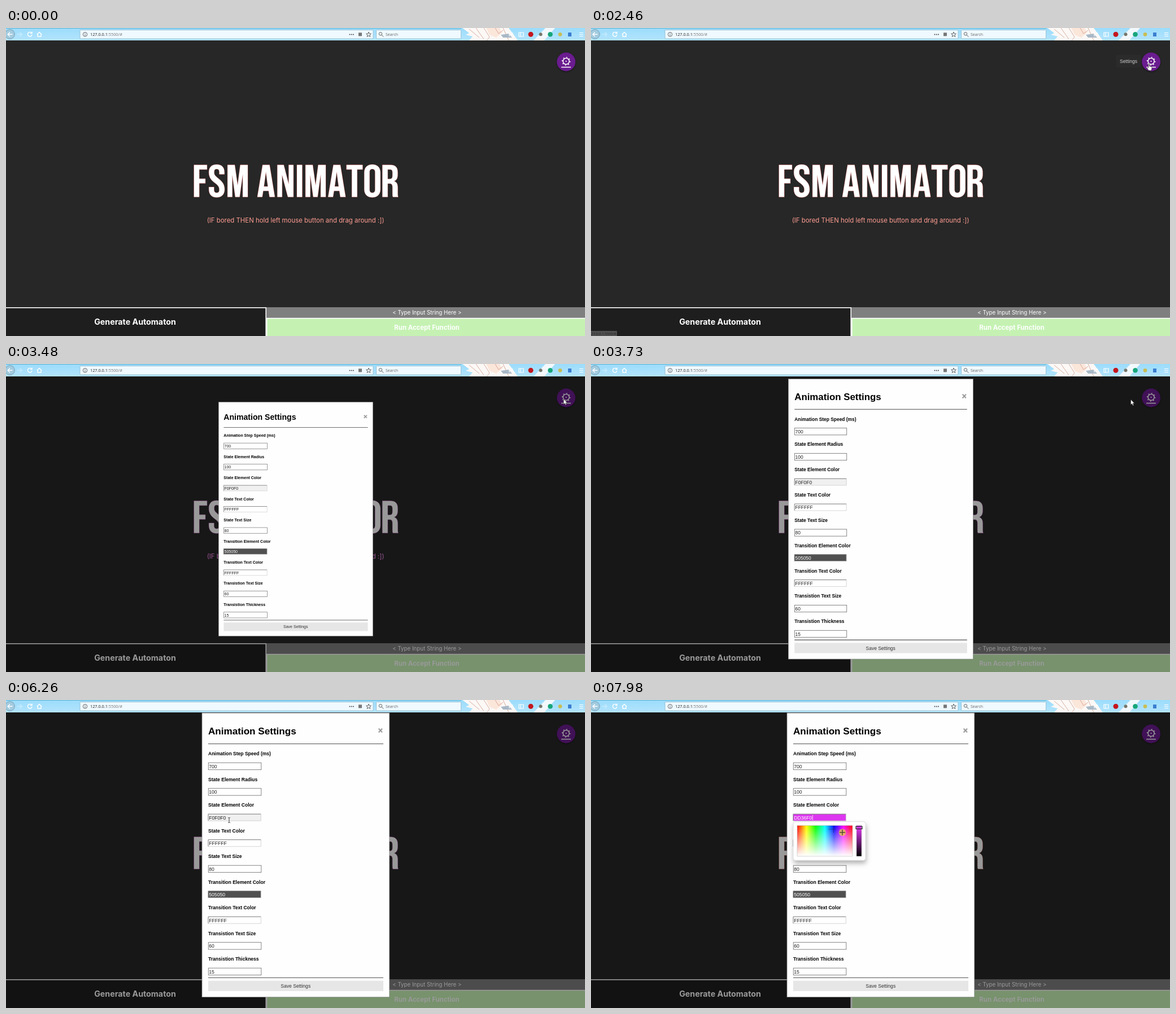
Animation of 1025x546 px, one loop 8 s. Source, as an HTML page:

```html
<!DOCTYPE html>
<html lang="en">
<head>
<meta charset="utf-8">
<title>FSM Animator</title>
<style>
  html, body { margin: 0; width: 100%; height: 100%; overflow: hidden; background: #272727; }
  svg { display: block; width: 100vw; height: 100vh; }
  .brand { font-family: Inter, sans-serif; text-anchor: middle; }
  .chrome { font-family: "Open Sans", sans-serif; }
  .form { font-family: "Liberation Sans", Arial, sans-serif; }
</style>
</head>
<body>
<svg id="stage" viewBox="0 0 1025 546" preserveAspectRatio="none">
  <defs>
    <linearGradient id="bar" x2="0" y2="1">
      <stop offset="0" stop-color="#9bdcfb"/><stop offset="1" stop-color="#b4e4fd"/>
    </linearGradient>
    <linearGradient id="hue">
      <stop offset="0" stop-color="#f00"/><stop offset=".1667" stop-color="#ff0"/>
      <stop offset=".3333" stop-color="#0f0"/><stop offset=".5" stop-color="#0ff"/>
      <stop offset=".6667" stop-color="#00f"/><stop offset=".8333" stop-color="#f0f"/>
      <stop offset="1" stop-color="#f00"/>
    </linearGradient>
    <linearGradient id="fade" x2="0" y2="1">
      <stop offset="0" stop-color="#fff" stop-opacity="0"/><stop offset="1" stop-color="#fff"/>
    </linearGradient>
    <linearGradient id="level" x2="0" y2="1">
      <stop id="levelTop" offset="0" stop-color="#fff"/><stop offset="1" stop-color="#000"/>
    </linearGradient>
    <filter id="drop" x="-30%" y="-30%" width="160%" height="180%">
      <feDropShadow dx="1" dy="5" stdDeviation="4" flood-opacity=".3"/>
    </filter>
    <filter id="lift" x="-30%" y="-30%" width="160%" height="160%">
      <feDropShadow dx="0" dy="1.2" stdDeviation="1.5" flood-opacity=".55"/>
    </filter>
    <clipPath id="barClip"><rect width="1025" height="22"/></clipPath>
  </defs>

  <g id="page">
    <rect y="22" width="1025" height="524" fill="#272727"/>
    <g id="title" fill="#fff" fill-rule="evenodd" stroke-width=".7" paint-order="stroke"></g>
    <text id="hint" class="brand" x="512.6" y="345" font-size="11.4">(IF bored THEN hold left mouse button and drag around :])</text>
    <rect y="495" width="461" height="51" fill="#fff"/>
    <rect y="496.6" width="459.4" height="49.4" fill="#1e1e1e"/>
    <text class="brand" x="228.5" y="526" font-size="14.25" font-weight="700" fill="#fff">Generate Automaton</text>
    <rect x="461" y="495" width="564" height="19" fill="#7f7f7f"/>
    <text class="brand" x="745.3" y="508" font-size="9.75" fill="#fff">&lt; Type Input String Here &gt;</text>
    <rect x="461" y="513.8" width="564" height="32.2" fill="#fff"/>
    <rect x="462.6" y="515.4" width="562.4" height="30.6" fill="#c5f2b3"/>
    <text class="brand" x="745" y="535" font-size="11.4" font-weight="700" fill="#fff">Run Accept Function</text>

    <circle cx="991.6" cy="60" r="16.4" fill="#6a1a8f" filter="url(#lift)"/>
    <g fill="none" stroke="#fff">
      <circle cx="991.6" cy="59" r="5.5" stroke-width="1.5"/>
      <circle cx="991.6" cy="59" r="7" stroke-width="1.7" stroke-dasharray="1.7 3.798"/>
      <path d="M983 69.5h17" stroke-width="1.5"/>
    </g>
    <circle cx="991.6" cy="59" r="1.1" fill="#fff"/>
    <g id="tooltip">
      <rect x="930" y="48" width="43.5" height="22" rx="2" fill="#2b2b2b"/>
      <text class="form" x="936" y="62" font-size="8.6" fill="#d0d0d0">Settings</text>
    </g>
    <g id="status">
      <rect y="537" width="46" height="9" fill="#505050"/>
      <text class="chrome" x="-3" y="544.3" font-size="6.1" fill="#222">127.0.0.1:5500/#</text>
    </g>
  </g>
  <rect id="dim" y="22" width="1025" height="524" opacity=".4"/>

  <g clip-path="url(#barClip)">
    <rect width="1025" height="22.5" fill="url(#bar)"/>
    <path d="M0 .5H806" stroke="#58b4d8"/>
    <path d="M808 0L820 9L814 12L826 15L820 22H906L890 0Z" fill="#fbf8f6"/>
    <path d="M850 0L856 12L868 17L878 8L874 0Z" fill="#fbe6da"/>
    <path d="M820 2L838 17M832 0L846 20M846 0L856 16L851 22M866 0L872 10L880 4M880 0L890 22" stroke="#c88f7c" stroke-width=".7" fill="none"/>
    <path d="M876 12L890 10L896 17H880Z" fill="#a9b8c6"/>
    <path d="M955 0H972L953 22H934Z" fill="#f2f8fc"/>

    <circle cx="7" cy="11" r="8.4" fill="#a3cbe0" stroke="#6d94a8" stroke-width=".8"/>
    <g fill="none" stroke="#fff" stroke-width="1.4">
      <path d="M11.5 11.3H3.5M7 7.5L3.2 11.3L7 15"/>
      <path d="M20 11.3H28M24.5 7.5L28.3 11.3L24.5 15" opacity=".35"/>
      <path d="M45 8.5A3.8 3.8 0 1 0 46 12M46 6.5V9.6H43"/>
      <path d="M54.8 11.5L59 7.5L63.2 11.5M56.2 11V15H62V11"/>
    </g>
    <g fill="#eff9ff" stroke="#8fb7ca" stroke-width=".8">
      <rect x="131" y="3.5" width="519" height="15.5" rx="1"/>
      <rect x="655.5" y="3.5" width="150" height="15.5" rx="1"/>
    </g>
    <g fill="none" stroke="#555" stroke-width=".9">
      <circle cx="140" cy="11.3" r="3.7"/><path d="M140 10.7V13.5M140 8.9V9.8"/>
      <path d="M642 7L643.2 10.1L646.4 10.2L643.9 12.3L644.8 15.4L642 13.6L639.2 15.4L640.1 12.3L637.6 10.2L640.8 10.1Z"/>
      <circle cx="663" cy="10.3" r="2.7"/><path d="M665 12.4L668.5 15.6"/>
    </g>
    <path d="M608.5 11.5h7" stroke="#444" stroke-width="2" stroke-linecap="round" stroke-dasharray="0 3.2"/>
    <rect x="624" y="8.3" width="6" height="6" fill="#777"/>
    <text class="chrome" x="149" y="14.2" font-size="7.3" fill="#777"><tspan fill="#222">127.0.0.1</tspan>:5500/#</text>
    <text class="chrome" x="672" y="14.2" font-size="7" fill="#666">Search</text>
    <g fill="none" stroke="#fff" stroke-width="1.2">
      <path d="M891 8V15M894 8V15M896 8L899 15"/>
      <path d="M908 8H916V15H908ZM911 8V15"/>
      <path d="M1015 8.5H1022M1015 11.5H1022M1015 14.5H1022"/>
    </g>
    <circle cx="929" cy="11.3" r="4.5" fill="#c4161d"/>
    <circle cx="946.5" cy="11.3" r="3" fill="#77776b"/>
    <circle cx="963.5" cy="11.3" r="4.3" fill="#17a67a"/>
    <circle cx="981" cy="11.3" r="3.4" fill="#c9bd55"/>
    <rect x="995" y="8" width="6" height="7" fill="#3b7fd0"/>
  </g>

  <g id="modal" class="form">
    <rect x="347" y="23" width="331.8" height="503.7" fill="#fefefe" stroke="#888" stroke-width=".7"/>
    <text x="358" y="61.4" font-size="17.1" font-weight="700">Animation Settings</text>
    <text x="658.8" y="59" font-size="14" font-weight="700" fill="#999" stroke="#999" stroke-width=".5">×</text>
    <path d="M358 77.6H668M358 492.4H668" stroke="#6e6e6e" stroke-width="1.3"/>
    <g id="fields" font-size="8.6"></g>
    <rect x="358" y="497.7" width="310" height="18.3" fill="#e6e6e6"/>
    <text x="512.7" y="510" font-size="8.6" fill="#333" text-anchor="middle">Save Settings</text>
    <path id="caret" stroke-width=".8"/>
    <g id="picker">
      <rect x="358" y="215.7" width="128" height="68.5" rx="4" fill="#fff" stroke="#ccc" stroke-width=".6" filter="url(#drop)"/>
      <rect x="365" y="222.5" width="98" height="54.5" fill="url(#hue)"/>
      <rect x="365" y="222.5" width="98" height="54.5" fill="url(#fade)" stroke="#bbb" stroke-width=".6"/>
      <rect x="470" y="222.5" width="9" height="54.5" fill="url(#level)" stroke="#bbb" stroke-width=".5"/>
      <rect x="469" y="224" width="11" height="4.5" fill="none" stroke="#222" stroke-width="1.2"/>
      <path id="trace" d="M420 229H434M429.5 223V235" stroke="#223" stroke-width=".8" opacity=".55"/>
      <path id="marker" d="M-5 0H5M0 -5V5" stroke="#222" stroke-width="1.4"/>
    </g>
  </g>

  <g id="cursor">
    <circle id="press" r="6.3" fill="#e6e02c" opacity=".65"/>
    <path id="arrow" d="M0 0V9.2L2.1 7.3L3.6 10.6L5.1 9.9L3.7 6.7H6.5Z" fill="#fff" stroke="#222" stroke-width=".6"/>
    <path id="hand" d="M-1 0C-1 -1 .8 -1 .8 0V4L5 5V8L4 11.5H-.5L-3.5 7.5C-4 6 -2.5 5.5 -1 7Z" fill="#fff" stroke="#222" stroke-width=".6"/>
    <path id="beam" d="M-2 -4.5Q0 -4.5 0 -3.5Q0 -4.5 2 -4.5M0 -3.5V3.5M-2 4.5Q0 4.5 0 3.5Q0 4.5 2 4.5" fill="none" stroke="#333" stroke-width=".9"/>
    <path id="cross" d="M-5 0H5M0 -5V5" stroke="#333" stroke-width="1"/>
  </g>
</svg>

<script>
const LOOP = 8000;
const $ = id => document.getElementById(id);
const show = (id, on) => $(id).setAttribute('visibility', on ? 'inherit' : 'hidden');
const set = (el, attrs) => { for (const k in attrs) el.setAttribute(k, attrs[k]); };
const clamp = (v, lo = 0, hi = 1) => Math.min(hi, Math.max(lo, v));

// Condensed capitals, 58 units tall
const glyphs = {
  F: 'M0 0H23.5V8.3H9.5V25H20.5V33.3H9.5V58H0Z',
  S: 'M28 17V13.5C28 4.5 23.5 -.7 14 -.7S0 4.5 0 13.5C0 23 4.5 28 12 33.5C17.5 38 18.8 40.5 18.8 45C18.8 49 17 50.5 14 50.5S9.2 49 9.2 44.5V40H0V44C0 53 4.5 58.7 14 58.7S28.3 53 28.3 44C28.3 35 24 30 16.5 24C11 19.5 9.5 17.5 9.5 13.5C9.5 9 11 7.5 14 7.5S18.8 9 18.8 13.3V17Z',
  M: 'M0 0H13L18.2 37L23 0H36.5V58H27.5V17L21.8 58H14L8.5 18V58H0Z',
  A: 'M9.5 0H22L31.5 58H22L20.3 47H10.5L8.8 58H0ZM11.8 39H19L15.4 12.5Z',
  N: 'M0 0H11.5L20.5 35V0H29V58H19L8.5 18V58H0Z',
  I: 'M0 0H9.5V58H0Z',
  T: 'M0 0H29V8.3H19.2V58H9.7V8.3H0Z',
  O: 'M0 14C0 5 5 -.7 14.5 -.7S29 5 29 14V44C29 53 24 58.7 14.5 58.7S0 53 0 44ZM9.5 13.5V44.5C9.5 49 11.5 50.5 14.5 50.5S19.5 49 19.5 44.5V13.5C19.5 9 17.5 7.5 14.5 7.5S9.5 9 9.5 13.5Z',
  R: 'M0 0H14C23.5 0 27.5 4.5 27.5 13V18C27.5 24 25.5 28 21 29.5C26 31.3 27.6 35 27.6 41V51C27.6 54 27.7 56 28.4 58H19C18.4 56.5 18.2 55.5 18.2 51V40.5C18.2 35.5 16.5 33.8 12.5 33.8H9.5V58H0ZM9.5 8.3V25.5H13C16.5 25.5 18.2 24 18.2 19.5V14C18.2 10 16.8 8.3 13.8 8.3Z'
};
const letterX = [332.8, 359.2, 392.2, 445, 480.4, 515, 530.2, 570.3, 602.8, 634.3, 666.4];
$('title').innerHTML = [...'FSMANIMATOR'].map((c, i) =>
  `<path d="${glyphs[c]}" transform="translate(${letterX[i]} 242.7) scale(.98)"/>`).join('');

// label, value, background when the field holds a colour
const fields = [
  ['Animation Step Speed (ms)', '700'],
  ['State Element Radius', '100'],
  ['State Element Color', 'F0F0F0', '#f0f0f0'],
  ['State Text Color', 'FFFFFF', '#fff'],
  ['State Text Size', '80'],
  ['Transition Element Color', '505050', '#505050'],
  ['Transition Text Color', 'FFFFFF', '#fff'],
  ['Transistion Text Size', '60'],
  ['Transistion Thickness', '15']
];
const rowY = i => 117.4 + 45.5 * i;
$('fields').innerHTML = fields.map(([label, value, color], i) => {
  const y = rowY(i), top = y - 6.2;
  const box = color
    ? `<rect class="box" x="358" y="${top}" width="93.3" height="12" fill="${color}"/>
       <path d="M358 ${top + 12}V${top}H451.3" fill="none" stroke="#777" stroke-width="1"/>
       <path d="M358 ${top + 12}H451.3V${top}" fill="none" stroke="#ccc" stroke-width=".8"/>`
    : `<rect class="box" x="358.3" y="${top}" width="93.5" height="12.4" fill="#fff" stroke="#777" stroke-width=".9"/>`;
  return `<text x="358" y="${y - 19.4}" font-size="8.54" font-weight="700">${label}</text>${box}
    <text class="value" x="359.3" y="${y + 3.2}" fill="${color === '#505050' ? '#fff' : '#222'}">${value}</text>`;
}).join('');
const boxes = document.querySelectorAll('.box');
const colorBox = boxes[2], colorText = document.querySelectorAll('.value')[2];

// Pointer path: time, x, y
const path = [
  [160, 978, 546], [480, 944, 310], [680, 954, 228], [920, 858, 97],
  [990, 846, 99], [1200, 790, 130], [1450, 850, 152], [1750, 936, 98],
  [1820, 946, 108], [2060, 968, 92], [2330, 988, 64], [3600, 987, 62],
  [3730, 956, 63], [3950, 870, 72], [4490, 446, 98], [4610, 420, 115],
  [4750, 420, 115], [5100, 432, 160], [5550, 402, 203], [5620, 404, 200],
  [5880, 414, 117], [6260, 395, 213], [6920, 395, 213], [7350, 458, 241],
  [7480, 458, 241], [7700, 427, 229], [7900, 445, 234.76], [8000, 445, 234.76]
];
function pointerAt(t) {
  const i = path.findIndex(p => p[0] > t);
  if (i < 1) return [path[0][1], path[0][2] + 20];
  const [t0, x0, y0] = path[i - 1], [t1, x1, y1] = path[i], f = (t - t0) / (t1 - t0);
  return [x0 + (x1 - x0) * f, y0 + (y1 - y0) * f];
}

const easeOut = p => 1 - (1 - p) ** 2.5;

function hsv(h, s, v) {
  return [5, 3, 1].map(n => {
    const k = (n + h / 60) % 6;
    return Math.round(v * (1 - s * clamp(Math.min(k, 4 - k))));
  });
}
const hex = rgb => rgb.map(c => c.toString(16).padStart(2, '0')).join('').toUpperCase();

const CLICK = 2900, ZOOM = 3086, ZOOM_TIME = 790, PICK = 6640, DRAG = 7530;

function render(t) {
  const [x, y] = pointerAt(t);
  const opened = t >= CLICK, picking = t >= PICK, dragging = t >= DRAG;

  const magenta = opened && !picking;
  $('hint').setAttribute('fill', magenta ? '#ff8cf5' : '#ff9d92');
  $('title').setAttribute('stroke', magenta ? '#e050d8' : '#d8504c');
  show('dim', opened);
  show('tooltip', t > 2300 && !opened);
  $('tooltip').setAttribute('opacity', clamp((t - 2300) / 150));
  show('status', t > 2260 && !opened);

  const scale = easeOut(clamp((t - ZOOM) / ZOOM_TIME));
  show('modal', scale > 0);
  $('modal').setAttribute('transform', `translate(512.9 275) scale(${scale}) translate(-512.9 -275)`);

  show('picker', picking);
  const px = dragging ? clamp(x, 365, 463) : 365, py = dragging ? clamp(y, 222.5, 277) : 277;
  const hue = (px - 365) / 98 * 360, sat = 1 - (py - 222.5) / 54.5;
  const value = hex(hsv(hue, sat, 240));
  colorBox.setAttribute('fill', '#' + value);
  colorText.textContent = value;
  colorText.setAttribute('fill', dragging ? '#fff' : '#222');
  $('levelTop').setAttribute('stop-color', '#' + hex(hsv(hue, sat, 255)));
  $('marker').setAttribute('transform', `translate(${px} ${py})`);
  show('trace', t > 7760);
  show('caret', picking && (dragging || (t - PICK) % 1000 < 500));
  set($('caret'), { d: dragging ? 'M392.3 204V213' : 'M391 204V213', stroke: dragging ? '#fff' : '#222' });

  const row = Math.round((y - rowY(0)) / 45.5);
  const inField = t > 3900 && !picking && x > 358 && x < 452 && row >= 0 && Math.abs(y - rowY(row)) < 6.3;
  boxes.forEach((b, i) => {
    if (!fields[i][2]) b.setAttribute('stroke', inField && i === row ? '#222' : '#777');
  });

  let kind = 'arrow';
  if (!opened && Math.hypot(x - 991.6, y - 60) < 16.4) kind = 'hand';
  else if (inField || (picking && y < 215.5)) kind = 'beam';
  else if (picking && x > 365 && x < 463 && y > 222.5 && y < 277) kind = 'cross';
  for (const id of ['arrow', 'hand', 'beam', 'cross']) show(id, id === kind);
  show('press', dragging || (opened && t < CLICK + 90) || (picking && t < PICK + 90));
  show('cursor', t >= 160);
  $('cursor').setAttribute('transform', `translate(${x} ${y})`);
}

function tick() {
  render(performance.now() % LOOP);
  requestAnimationFrame(tick);
}
tick();
</script>
</body>
</html>
```
